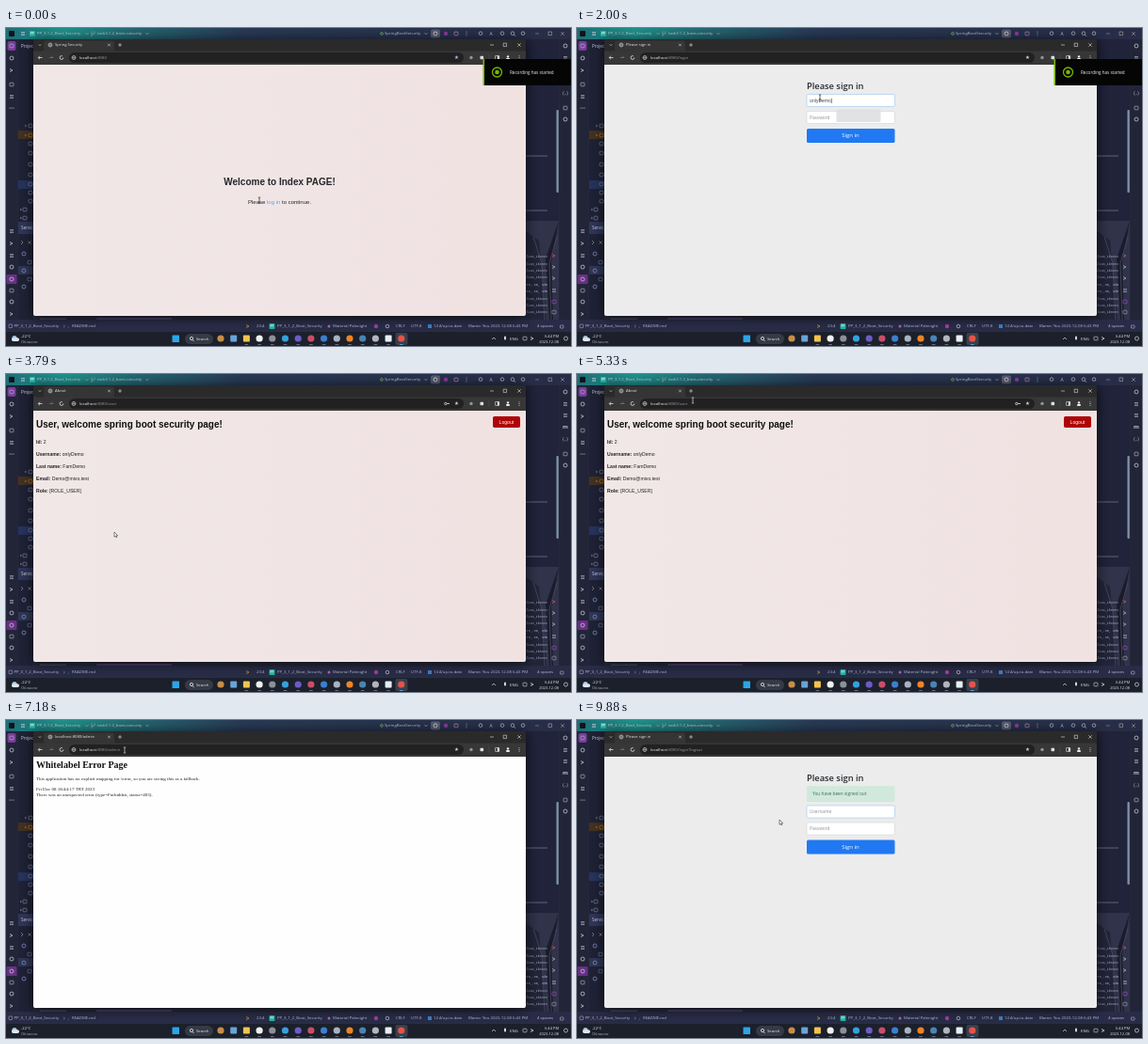
These frames come from a looping animation (600x338 px, 9.91 s). An HTML page with a canvas:

```html
<!DOCTYPE html>
<html lang="en">
<head>
<meta charset="utf-8">
<title>Login walkthrough</title>
<style>
html, body { margin: 0; width: 100%; height: 100%; overflow: hidden; background: #242739; }
canvas { display: block; }
</style>
</head>
<body>
<canvas id="stage" width="600" height="338"></canvas>
<script>
const ctx = document.getElementById('stage').getContext('2d');
const LOOP = 9910;
const UI = '"Open Sans", sans-serif', ARIAL = '"Liberation Sans", Arial, sans-serif';
const TIMES = '"Liberation Serif", Times, serif', MONO = '"Liberation Mono", monospace';

function box(x, y, w, h, color, r = 0, border) {
  ctx.beginPath();
  ctx.roundRect(x, y, w, h, r);
  ctx.fillStyle = color;
  ctx.fill();
  if (border) { ctx.strokeStyle = border; ctx.lineWidth = 0.6; ctx.stroke(); }
}
function shadowed(blur, paint) {
  ctx.save();
  ctx.shadowColor = '#000b';
  ctx.shadowBlur = blur;
  ctx.shadowOffsetY = 1;
  paint();
  ctx.restore();
}
function dot(x, y, r, color) {
  ctx.beginPath();
  ctx.arc(x, y, r, 0, 7);
  ctx.fillStyle = color;
  ctx.fill();
}
function ring(x, y, r, color, width = 0.8, sweep = 7) {
  ctx.beginPath();
  ctx.arc(x, y, r, 0, sweep);
  ctx.strokeStyle = color;
  ctx.lineWidth = width;
  ctx.stroke();
}
function line(points, color, width = 0.8) {
  ctx.beginPath();
  for (let i = 0; i < points.length; i += 2) ctx.lineTo(points[i], points[i + 1]);
  ctx.strokeStyle = color;
  ctx.lineWidth = width;
  ctx.stroke();
}
function shape(points, color, border) {
  ctx.beginPath();
  for (let i = 0; i < points.length; i += 2) ctx.lineTo(points[i], points[i + 1]);
  ctx.closePath();
  ctx.fillStyle = color;
  ctx.fill();
  if (border) { ctx.strokeStyle = border; ctx.lineWidth = 0.6; ctx.stroke(); }
}
// Draws text centred vertically on y and returns where it ends.
function text(s, x, y, color, size, family = UI, weight = 400, align = 'left') {
  ctx.font = `${weight} ${size}px ${family}`;
  ctx.textAlign = align;
  ctx.textBaseline = 'middle';
  ctx.fillStyle = color;
  ctx.fillText(s, x, y + size * 0.08);
  return x + ctx.measureText(s).width;
}
function cross(x, y, r, color) {
  line([x - r, y - r, x + r, y + r], color, 0.6);
  line([x - r, y + r, x + r, y - r], color, 0.6);
}
const chevron = (x, y, color = '#bbb') => line([x - 1.4, y - 0.7, x, y + 0.8, x + 1.4, y - 0.7], color, 0.7);
function globe(x, y) {
  ring(x, y, 2, '#c8c8c8', 0.7);
  line([x - 2, y, x + 2, y], '#c8c8c8', 0.5);
  line([x, y - 2, x, y + 2], '#c8c8c8', 0.5);
}
function glyph(kind, x, y, color) {
  if (kind === 0) ring(x, y, 2, color);
  else if (kind === 1) box(x - 2, y - 1.8, 4, 3.6, 'transparent', 0.6, color);
  else if (kind === 2) for (const d of [-1.5, 0, 1.5]) line([x - 2, y + d, x + 2, y + d], color, 0.6);
  else if (kind === 3) line([x - 2, y - 1.5, x + 1, y, x - 2, y + 1.5], color);
  else for (const d of [-2, 0, 2]) dot(x + d, y, 0.6, color);
}

function ide() {
  box(0, 0, 600, 338, '#25283a');
  const bar = ctx.createLinearGradient(0, 0, 600, 0);
  bar.addColorStop(0, '#1d6d75');
  bar.addColorStop(0.1, '#1f938d');
  bar.addColorStop(0.24, '#256470');
  bar.addColorStop(0.42, '#293a56');
  bar.addColorStop(1, '#282c46');
  box(0, 0, 600, 12, bar);
  box(3, 3, 6, 6, '#11131e', 1);
  glyph(2, 18, 6, '#d0d4e0');
  box(25, 3, 6, 6, '#1fb7a0', 1);
  text('PP', 28, 6, '#fff', 3, UI, 700, 'center');
  text('PP_3.1.2_Boot_Security', 33, 6, '#d0d5e2', 4.3);
  chevron(86, 6);
  line([91, 3.5, 91, 9], '#bbb', 0.6);
  line([91, 7, 94, 5.8, 94, 3.5], '#bbb', 0.6);
  text('task3.1.2_boot+security', 97, 6, '#d0d5e2', 4.3);
  chevron(150, 6);
  ring(399, 6, 1.4, '#77b766');
  text('SpringBootSecurity', 402, 6, '#c4c9d8', 4.3);
  chevron(446, 6);
  box(451, 1.5, 10, 9, '#595c72', 2);
  ring(456, 6, 2, '#ddd');
  dot(467, 6, 2.2, '#8b3c9e');
  glyph(1, 478, 6, '#d8a5d4');
  for (const d of [-2, 0, 2]) dot(489, 6 + d, 0.5, '#bbb');
  [504, 527, 538, 549].forEach(x => ring(x, 5.7, 1.8, '#c4c9d8', 0.7));
  line([539.3, 7, 541, 8.8], '#c4c9d8');
  text('A', 515, 6, '#c4c9d8', 5, UI, 400, 'center');
  line([562, 6, 566, 6], '#aaa', 0.5);
  box(576, 4, 3.6, 3.6, 'transparent', 0, '#aaa');
  cross(591, 6, 1.8, '#aaa');

  // Project tree and services
  box(0, 12, 12, 298, '#222538');
  box(13, 12, 16, 298, '#1f2236');
  box(1.5, 14, 9, 10, '#793c9b', 2);
  box(0.5, 262, 11, 10, '#6a2f86', 1);
  [19, 32, 45, 60, 73, 85, 216, 229, 242, 254, 267, 279, 291, 304].forEach((y, i) =>
    glyph([1, 0, 3, 1, 2, 4, 2, 3, 2, 0, 0, 1, 0, 3][i], 6, y, '#c1c5d5'));
  text('Project', 16, 19.7, '#d5d8e2', 4.5);
  box(13, 109, 16, 9, '#45311f');
  box(13, 162, 16, 9, '#26335c');
  [104, 114, 123, 133, 145, 156, 166, 175, 184].forEach((y, i) => {
    if (i < 2) line([20, y - 1, 21.5, y, 20, y + 1], '#999', 0.6);
    glyph(1, 26, y, i === 1 ? '#d98b36' : '#8f98b8');
  });
  [193, 202].forEach(y => { line([15, y - 1, 16.5, y, 15, y + 1], '#999', 0.6); glyph(1, 20, y, '#9299b0'); });
  box(13, 206, 16, 13, '#30355a');
  text('Servic', 16, 212.7, '#d5d8e2', 4.5);
  line([16, 226, 18, 228, 16, 230], '#aaa', 0.6);
  cross(25, 228, 1.5, '#aaa');
  box(13, 253, 16, 9, '#303656');
  [240, 249, 258, 267, 275].forEach((y, i) => glyph(i % 2, i % 2 ? 25 : 19, y, '#7d91c0'));
  ctx.globalAlpha = 0.35;
  box(36, 308.5, 28, 1.3, '#8d92aa');
  box(96, 308, 80, 2.4, '#8164ad', 1);
  ctx.globalAlpha = 1;

  // Editor and console on the right
  box(551, 12, 36, 298, '#20233a');
  shape([551, 205, 587, 205, 587, 310, 551, 310], '#30334a');
  shape([551, 215, 566, 226, 574, 310, 551, 310], '#222539');
  shape([587, 205, 573, 245, 577, 310, 581, 310, 579, 248], '#1a1c2b');
  line([560, 222, 569, 250, 572, 310], '#4b4d5d', 0.8);
  line([585, 222, 577, 250, 579, 310], '#4b4d5d', 0.8);
  line([552, 136, 575, 136], '#8a93aa', 0.6);
  line([552, 194, 575, 194], '#8a93aa', 0.6);
  box(584.5, 87, 2.3, 88, '#7f93a9', 1);
  for (let i = 0; i < 9; i++)
    text(i === 4 || i === 5 ? 'user0_.em, adm' : 'alias_ibnnex', 575, 243 + i * 7.4, '#a6aec4', 3.4, MONO, 400, 'right');
  [242, 254, 266, 279, 291, 302].forEach((y, i) =>
    glyph([3, 3, 3, 2, 1, 1][i], 582, y, i === 0 ? '#d05565' : i === 4 ? '#a65ccb' : '#a8aec0'));
  box(588, 12, 12, 298, '#222538');
  [19, 32, 44, 85, 97].forEach((y, i) => glyph([0, 2, 2, 1, 0][i], 594, y, '#c1c5d5'));
  text('m', 594, 56, '#c1c5d5', 6, UI, 700, 'center');
  text('{..}', 594, 69, '#c1c5d5', 4.5, UI, 400, 'center');

  // Status bar
  box(0, 310, 600, 13, '#282c46');
  box(3, 315, 3.6, 3.6, 'transparent', 0.5, '#aab');
  text('PP_3_1_2_Boot_Security', 8.5, 317, '#bcc2d4', 4.3);
  line([61, 315.7, 62.5, 317, 61, 318.3], '#999', 0.6);
  text('↓', 65, 317, '#5ba3d8', 4.5);
  text('README.md', 70, 317, '#bcc2d4', 4.3);
  glyph(3, 257, 317, '#c0983a');
  text('23:4', 266, 317, '#bcc2d4', 4.3);
  box(279.5, 314, 6, 6, '#1fb7a0', 1);
  text('PP', 282.5, 317, '#fff', 3, UI, 700, 'center');
  text('PP_3_1_2_Boot_Security', 288, 317, '#bcc2d4', 4.3);
  dot(343, 317, 1.5, '#ad64ba');
  text('Material Palenight', 347, 317, '#bcc2d4', 4.3);
  dot(393, 317, 2.2, '#a33ca5');
  ring(405, 317, 1.8, '#bbc');
  text('CRLF', 414, 317, '#bcc2d4', 4.3);
  text('UTF-8', 430, 317, '#bcc2d4', 4.3);
  box(448, 315, 4, 4, '#3c80c9');
  text('14 Δ/up-to-date', 454, 317, '#bcc2d4', 4.2);
  text('Blame: You 2023-12-08 6:43 PM', 491, 317, '#bcc2d4', 4.3);
  text('4 spaces', 564, 317, '#bcc2d4', 4.3);
  box(588.5, 316, 3.5, 3, 'transparent', 0.5, '#bbc');
}

function taskbar() {
  box(0, 323, 600, 15, '#1b202b');
  dot(9, 329.5, 2.6, '#a9c6ea');
  box(6, 329.3, 8, 3.7, '#dbe7f3', 1.8);
  text('-22°C', 16, 328, '#e5e7ea', 4.1);
  text('Облачно', 16, 333.3, '#a9adb5', 4);
  box(176.5, 326.5, 7.5, 7.5, '#2ba4e8', 0.5);
  box(190, 325, 30, 11, '#343a46', 5.5);
  ring(197, 330, 1.6, '#eee');
  line([198, 331.4, 199.5, 333], '#eee');
  text('Search', 202, 330.5, '#e5e7ea', 4.3);
  box(413.5, 324, 13, 13, '#39404d', 2);
  ['#c78d48', '#6aa3d8', '#f2c252', '#f0f0f0', '#8c9098', '#35a0dc', '#6b5bc6', '#c64f68',
    '#3b7fd0', '#a9b2c0', '#ed8427', '#4b83b3', '#b2b5bb', '#e6eef6', '#e4534a'].forEach((color, i) => {
    const x = 228 + i * 13.7;
    if (i === 1 || i === 2 || i === 13) box(x - 3.5, 326.5, 7, 7, color, 1);
    else dot(x, 330, 3.6, color);
    if (i > 1) box(x - 2, 336, 4, 0.8, i === 14 ? '#62bdf5' : '#858b96', 0.4);
  });
  line([516, 331, 518, 329, 520, 331], '#ddd', 0.7);
  box(529, 327.5, 2, 4, '#ddd', 1);
  text('ENG', 535, 330.3, '#e5e7ea', 4.3);
  glyph(1, 551, 330, '#ddd');
  glyph(3, 559, 330, '#ddd');
  text('6:44 PM', 587, 328, '#e5e7ea', 4, UI, 400, 'right');
  text('2023-12-08', 587, 333.3, '#e5e7ea', 4, UI, 400, 'right');
  ring(594.5, 330, 2, '#ddd', 0.7);
}

function address(host, path, x) {
  return text(path, text(host, x, 31.5, '#f0f0f0', 4.3), 31.5, '#989898', 4.3);
}
function browser(title, path, hasKey) {
  shadowed(14, () => box(29, 12, 523, 294, '#2a2a2b', 2));
  chevron(36, 18);
  box(40, 13.5, 75, 14, '#353536', 3);
  globe(47, 18);
  text(title, 52, 18, '#e6e6e6', 4.2);
  cross(109.5, 18, 1.3, '#ddd');
  line([119, 18, 123, 18], '#ddd', 0.6);
  line([121, 16, 121, 20], '#ddd', 0.6);
  line([514, 18, 518, 18], '#ddd', 0.6);
  box(528.2, 16.2, 3.4, 3.4, 'transparent', 0, '#ddd');
  cross(545, 18, 1.7, '#ddd');
  box(29, 24.5, 523, 14.5, '#373738');
  line([38.5, 31.5, 34.2, 31.5, 36, 29.7], '#e0e0e0', 0.8);
  line([34.2, 31.5, 36, 33.3], '#e0e0e0', 0.8);
  line([46, 31.5, 50, 31.5, 48.3, 29.8], '#777', 0.8);
  ring(59, 31.5, 1.9, '#e0e0e0', 0.8, 5.2);
  box(67, 26, 419, 11, '#212122', 5.5);
  globe(72, 31.5);
  address('localhost', ':8080' + path, 78);
  if (hasKey) { ring(466.8, 31.5, 1.2, '#ddd'); line([468, 31.5, 471, 31.5], '#ddd'); }
  text('★', 478.5, 31.2, path ? '#d5d5d5' : '#a8c7fa', 5.5, '"DejaVu Sans", sans-serif', 400, 'center');
  dot(494, 31.5, 1.7, '#92959a');
  box(503.5, 29.7, 3.6, 3.6, '#ddd', 0.8);
  line([513, 28, 513, 35], '#555', 0.5);
  box(519.5, 29.5, 4.2, 4, 'transparent', 0.4, '#ddd');
  box(521.8, 29.5, 2, 4, '#ddd');
  dot(533, 30.4, 1.2, '#eee');
  box(531, 32, 4, 2, '#eee', 1);
  for (const d of [-1.7, 0, 1.7]) dot(545, 31.5 + d, 0.5, '#ddd');
}
const sheet = color => box(29, 39, 523, 267, color, [0, 0, 2, 2]);
function pinkSheet() {
  const g = ctx.createLinearGradient(30, 0, 551, 0);
  g.addColorStop(0, '#f1e7e7');
  g.addColorStop(1, '#f1e2e2');
  sheet(g);
}

function indexPage() {
  browser('Spring Security', '');
  pinkSheet();
  text('Welcome to Index PAGE!', 290.5, 163, '#25272b', 10, ARIAL, 700, 'center');
  let x = text('Please ', 257, 185, '#25272b', 6, ARIAL);
  x = text('log in', x, 185, '#55a5ec', 6, ARIAL);
  text(' to continue.', x, 185, '#25272b', 6, ARIAL);
}
function field(y, value, hint, focused) {
  box(244, y, 93.5, 13, '#fff', 1.5, focused ? '#9cc3ee' : '#cfd3d7');
  return text(value || hint, 247, y + 6.5, value ? '#33373c' : '#8a8f95', 4.8);
}
function loginPage(t, signedOut) {
  browser('Please sign in', signedOut ? '/login?logout' : '/login');
  sheet('#ececec');
  text('Please sign in', 244, 62, '#25292e', 9.3, UI, 600);
  const shift = signedOut ? 20.5 : 0;
  if (signedOut) {
    box(244, 70, 93.5, 17, '#d1e9dc', 1.5);
    text('You have been signed out', 250, 78.3, '#3c7158', 4.8);
  }
  const typed = signedOut ? 0 : Math.max(0, Math.floor((t - 1250) / 85));
  const dots = signedOut ? 0 : Math.max(0, Math.min(8, Math.floor((t - 2150) / 65)));
  const inPassword = !signedOut && t > 2100;
  const end = field(70.5 + shift, 'onlyDemo'.slice(0, typed), 'Username', !inPassword);
  field(88.5 + shift, '•'.repeat(dots), 'Password', inPassword);
  if (typed && !inPassword) line([end + 0.5, 74.5, end + 0.5, 80], '#333', 0.5);
  if (!signedOut && t > 1450 && t < 2150) {
    ctx.globalAlpha = Math.min(1, (2150 - t) / 160);
    box(275.5, 86.5, 47, 13.5, '#dfe0e1', 1);
    ctx.globalAlpha = 1;
  }
  box(244, 107 + shift, 93.5, 15, '#2079f3', 1.5);
  text('Sign in', 290.5, 114.4 + shift, '#fff', 6, UI, 400, 'center');
}
function userPage() {
  browser('About', '/user', true);
  pinkSheet();
  text('User, welcome spring boot security page!', 32, 53.5, '#101010', 10, ARIAL, 700);
  [['Id:', '2'], ['Username:', 'onlyDemo'], ['Last name:', 'FamDemo'], ['Email:', 'Demo@mivo.test'], ['Role:', '[ROLE_USER]']]
    .forEach(([name, value], i) => {
      const y = 72.3 + i * 13;
      text(' ' + value, text(name, 32, y, '#222', 5.1, ARIAL, 700), y, '#222', 5.1, ARIAL);
    });
  box(517, 45, 29, 12, '#ae0407', 1.7);
  text('Logout', 531.4, 51, '#fff', 5.1, ARIAL, 400, 'center');
}
function errorPage() {
  browser('localhost:8080/admin', '/admin');
  sheet('#fefefe');
  text('Whitelabel Error Page', 32, 47.2, '#111', 10, TIMES, 700);
  text('This application has no explicit mapping for /error, so you are seeing this as a fallback.', 32, 62.5, '#222', 5, TIMES);
  text('Fri Dec 08 18:44:17 TRT 2023', 32, 73, '#222', 5, TIMES);
  text('There was an unexpected error (type=Forbidden, status=403).', 32, 79, '#222', 5, TIMES);
}

function suggestions(t) {
  const typed = t > 6200;
  shadowed(6, () => box(65, 24, 423, typed ? 42.5 : 14, '#27282b', 5));
  globe(74, 31.5);
  const erased = Math.max(0, Math.floor((t - 5750) / 90));
  const path = typed ? '/a' : '/' + 'user'.slice(0, Math.max(0, 4 - erased));
  const end = address('localhost', ':8080' + path, 82);
  if (!typed) { line([end + 0.5, 29, end + 0.5, 34], '#ddd', 0.5); return; }
  ctx.font = `400 4.3px ${UI}`;
  box(end, 28.5, ctx.measureText('dmin').width, 6.3, '#3a8fd8');
  text('dmin', end, 31.5, '#fff', 4.3);
  box(65, 38.5, 418, 12.5, '#3d3f43', [0, 6, 6, 0]);
  box(65, 38.5, 1, 12.5, '#8ab4f8');
  globe(74, 44.7);
  let x = text('A', 82, 44.7, '#fff', 4.3, UI, 700);
  x = text('dminPanel', x, 44.7, '#f0f0f0', 4.3);
  x = text(' - ', x, 44.7, '#aaa', 4.3);
  x = text('localhost:8080/a', x, 44.7, '#8ab4f8', 4.3, UI, 700);
  text('dmin', x, 44.7, '#8ab4f8', 4.3);
  cross(474, 44.7, 1.5, '#ddd');
  ring(73.6, 56.8, 1.4, '#c8c8c8');
  line([74.7, 58, 76.2, 59.4], '#c8c8c8');
  x = text('localhost:8080/a', 82, 57.2, '#f0f0f0', 4.2, UI, 600);
  text(' - Quelvo Search', x, 57.2, '#a8a8a8', 4.3);
}

function toast(t) {
  const out = Math.max(0, Math.min(1, (t - 2550) / 350));
  if (out === 1) return;
  ctx.save();
  ctx.translate(94 * out * out, 0);
  box(507, 33, 93, 28, '#050505');
  box(506.5, 33, 1.6, 28, '#78b900');
  ring(521.5, 47, 5, '#78b900', 1.3);
  dot(521.5, 47, 2.3, '#78b900');
  text('Recording has started', 535, 47, '#f0f0f0', 4.6);
  ctx.restore();
}

// Pointer stops: time, x, y
const stops = [[0, 269, 183], [150, 269, 183], [450, 284, 185], [650, 284, 185], [1100, 258, 74], [2900, 258, 74],
  [3500, 115, 168], [4600, 115, 168], [5330, 123, 28], [5550, 126, 32], [7500, 126, 32], [8400, 36, 31],
  [8880, 36, 31], [9240, 531, 50], [9420, 531, 50], [9860, 215, 106], [LOOP, 215, 106]];
function pointer(t) {
  const i = stops.findIndex(s => s[0] > t);
  const [t0, x0, y0] = stops[i - 1], [t1, x1, y1] = stops[i];
  const p = (t - t0) / (t1 - t0), e = p * p * (3 - 2 * p);
  const x = x0 + (x1 - x0) * e, y = y0 + (y1 - y0) * e;
  const beam = t < 200 || (t > 1000 && t < 2950) || (t > 5250 && t < 7700);
  if (beam) {
    const color = y < 38 ? '#ddd' : '#222';
    line([x, y - 3, x, y + 3], color, 0.7);
    for (const d of [-3, 3]) line([x - 1.2, y + d, x + 1.2, y + d], color, 0.6);
  } else {
    shape([x, y, x, y + 5.2, x + 1.2, y + 4.1, x + 2, y + 5.8, x + 2.8, y + 5.4, x + 2.1, y + 3.8, x + 3.7, y + 3.7], '#fff', '#333');
  }
}

function draw(now) {
  const t = now % LOOP;
  ide();
  taskbar();
  if (t < 600) indexPage();
  else if (t < 2850) loginPage(t, false);
  else if (t < 6700) userPage();
  else if (t < 8850) errorPage();
  else if (t < 9380) userPage();
  else loginPage(t, true);
  if (t > 5560 && t < 6700) suggestions(t);
  toast(t);
  pointer(t);
  requestAnimationFrame(draw);
}
requestAnimationFrame(draw);
</script>
</body>
</html>
```
